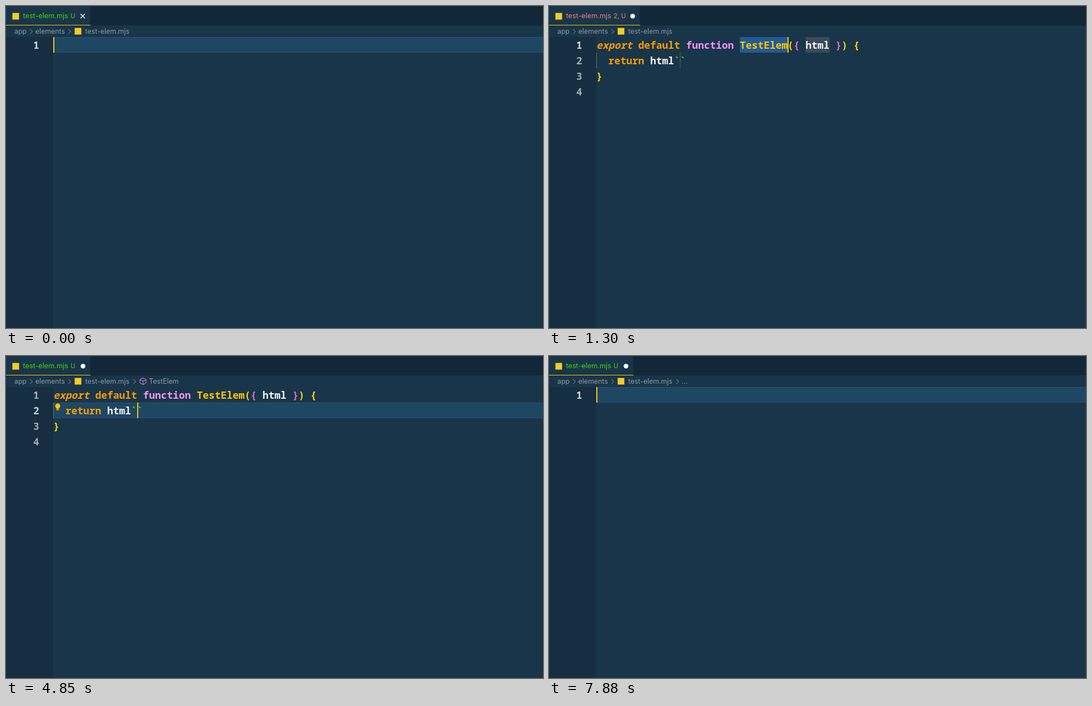
Write an HTML page with a canvas that moves like this. It is 966 px wide and 580 px high and loops after 8 s.

```html
<!DOCTYPE html>
<html lang="en">
<head>
<meta charset="utf-8">
<title>Snippet in a code editor</title>
<style>
html, body { margin: 0; width: 100%; height: 100%; overflow: hidden; background: #193549; }
canvas { display: block; }
</style>
</head>
<body>
<canvas id="stage" width="966" height="580"></canvas>
<script>
const c = document.getElementById('stage').getContext('2d');
const LOOP = 8000, LEFT = 85.3, TOP = 56, ROW = 28, CH = 10.752;
const MONO = '"Noto Sans Mono", "DejaVu Sans Mono", monospace', UI = 'Inter, Roboto, sans-serif';
const CODE = `600 17.92px ${MONO}`, ITALIC = `italic ${CODE}`, DETAIL = `600 15.25px ${MONO}`;
const GOLD = '#ffc600', ORANGE = '#ff9d00', PINK = '#fb94ff', GREEN = '#3ad900', BRACKET = '#ffd700',
  ORCHID = '#da70d6', WHITE = '#f0f4f6', GREY = '#aaaeb0', DIM = '#7c878e', BG = '#193549', PANEL = '#15232d';

const col = n => LEFT + n * CH;
const rowY = n => TOP + n * ROW;

function box(x, y, w, h, color) {
  c.fillStyle = color;
  c.fillRect(x, y, w, h);
}
function frame(x, y, w, h, color) {
  c.strokeStyle = color;
  c.lineWidth = 1;
  c.strokeRect(x + .5, y + .5, w - 1, h - 1);
}
function text(s, x, y, color, font = CODE, align = 'left') {
  c.font = font;
  c.fillStyle = color;
  c.textAlign = align;
  c.fillText(s, x, y);
}
function path(d, x, y, color, width = 1) {
  c.save();
  c.translate(x, y);
  c.strokeStyle = color;
  c.lineWidth = width;
  c.stroke(new Path2D(d));
  c.restore();
}
function disc(x, y, r, color) {
  c.fillStyle = color;
  c.beginPath();
  c.arc(x, y, r, 0, 7);
  c.fill();
}
// Parts are [text, colour, font], set one after another on the character grid.
function parts(x, y, list) {
  for (const [s, color, font] of list) {
    text(s, x, y, color, font);
    x += s.length * CH;
  }
}

const cube = (x, y) => path('M0-6L5.5-3V3L0 6L-5.5 3V-3ZM-5.5-3L0 0L5.5-3M0 0V6', x, y, '#b180d7', 1.1);
const icons = {
  k: (x, y) => path('M-7-4.5H-1M1-4.5H6M-7-1.5H3M-7 1.5H-3M-1 1.5H6M-7 4.5H1M3 4.5H6', x, y, '#b8bdc0', 1.2),
  f: cube,
  v: (x, y) => path('M-4-4H-6.5V4H-4M4-4H6.5V4H4M-3.5-.5L.5-2.5L3.5-1.5V1L-.5 3L-3.5 2ZM-3.5-.5L-.5 .5L3.5-1.5M-.5 .5V3', x, y, '#75beff', 1.1),
  s(x, y) {
    path('M-6 5.5V-5.5H6V5.5', x, y, '#b8bdc0');
    c.setLineDash([1, 1]);
    path('M-6 5.5H6', x, y, '#b8bdc0');
    c.setLineDash([]);
  }
};

// Each entry: icon, label (* marks a matched letter), detail; "-" marks a deprecated one.
const listOne = ['k|*else', 'f|*encodeURI', 'f|*encodeURIComponent', 'f|*eval', 'k|*export', 'v|*exports',
  'k|*extends', 's|*eelem|Enhance elem', 's|*error|Log error to console', 's|*etelem|Enhance typed elem'];
const listTwo = ['s|*e*elem|Enhance elem', 'v|*Eval*Error', 'v|*Error*Event', 's|*et*elem|Enhance typed elem',
  'v|-event', 'k|*els*e', 'k|*ext*ends', 'v|-external', 'v|*El*ement', 'v|*El*ementInternals'];

function suggest(x, list) {
  box(x, 84, 417, 282, PANEL);
  frame(x, 84, 417, 282, '#122430');
  box(x + 1, 85, 415, 28, BG);
  list.forEach((entry, i) => {
    const [icon, label, detail] = entry.split('|'), y = 85 + i * ROW, base = y + 20.5;
    icons[icon](x + 10.5, y + 14.5);
    let lx = x + 22.3;
    if (label[0] === '-') {
      text(label.slice(1), lx, base, DIM);
      box(lx, y + 14, (label.length - 1) * CH, 1.4, DIM);
    } else {
      for (const m of label.match(/\*?./g)) {
        text(m.slice(-1), lx, base, m[1] ? GOLD : GREY);
        lx += CH;
      }
    }
    if (detail) text(detail, x + 406.5, y + 19.5, i ? '#c3c7c9' : DIM, DETAIL, 'right');
  });
}

function docs() {
  const x = 528.4;
  box(523, 84, 320, 165, PANEL);
  frame(523, 84, 320, 165, '#122430');
  text('Export Enhance element (Enh', x, 109, DIM);
  text('ance.dev)', x, 137, DIM);
  c.save();
  c.beginPath();
  c.rect(523, 84, 320, 164);
  c.clip();
  parts(x, 180.5, [['export', ORANGE, ITALIC], [' default', ORANGE], [' function', PINK], [' (', '#ffee80'], ['{ html }', WHITE]]);
  parts(x + 4 * CH, 208.5, [['return', ORANGE], [' html', GOLD], ['``', GREEN]]);
  text('}', x, 236, WHITE);
  c.restore();
  box(524, 239, 251, 9, '#1b3a50');
  path('M-3.5-3.5L3.5 3.5M3.5-3.5L-3.5 3.5', 826.5, 98, '#b8bdc0');
}

function tab(errors, dirty) {
  const color = errors ? '#ec8575' : GREEN;
  const w = errors ? 162 + errors : 152;
  box(0, 0, 966, 35, '#122738');
  box(0, 0, 966, 1, '#1a2f40');
  box(0, 1, w, 34, BG);
  box(0, 34, w, 1, GOLD);
  box(w - 1, 1, 1, 33, '#15293a');
  box(11.5, 12.5, 12, 12, '#f5cc25');
  text('test-elem.mjs', 30.5, 22.3, color, `12.7px ${UI}`);
  text(errors ? errors + ', U' : 'U', 116, 22.3, color, `11.6px ${UI}`);
  if (dirty) disc(w - 13.5, 18.3, 4.2, '#fff');
  else path('M-4-4L4 4M4-4L-4 4', 138, 18.3, '#fff', 1.3);
}

function crumbs(last) {
  const font = `12.4px ${UI}`, color = '#8c9aa3';
  const chevron = x => path('M-2-4.5L2.5 0L-2 4.5', x, 46, color);
  text('app', 15, 50.3, color, font);
  chevron(45);
  text('elements', 52.7, 50.3, color, font);
  chevron(114);
  box(123.5, 39.5, 12, 12, '#f5cc25');
  text('test-elem.mjs', 142.5, 50.3, color, font);
  if (!last) return;
  chevron(231);
  if (last === '...') return text(last, 238.5, 50.3, color, font);
  cube(246.5, 45.5);
  text(last, 257.3, 50.3, color, font);
}

function highlight(n) {
  box(85, rowY(n), 881, ROW, '#1f4662');
  box(85, rowY(n), 881, 1, '#2a5474');
  box(85, rowY(n) + ROW - 1, 881, 1, '#2a5474');
}
function numbers(count, active) {
  for (let i = 0; i < count; i++) text(i + 1, 59.8, rowY(i) + 20.5, i === active ? '#d0d6d8' : '#a6adb1', CODE, 'right');
}
const cursor = (n, row) => box(Math.round(col(n) - .3), rowY(row), 2, ROW, GOLD);
function bulb(x, row) {
  const y = rowY(row);
  disc(x, y + 6, 4.5, GOLD);
  box(x - 2.2, y + 9, 4.4, 4.5, GOLD);
  box(x - 2.2, y + 11, 4.4, .8, '#8a7420');
}
const mark = (n, len, row, color) => box(col(n), rowY(row), len * CH, ROW, color);

function typing(t) {
  const n = t < 250 || t >= 7800 ? 0 : t < 650 ? 1 : 2;
  highlight(0);
  numbers(1, 0);
  text('e'.repeat(n), LEFT, 76.5, WHITE);
  if (n && t >= 330) path('M0 1' + 'q1.35-2.5 2.7 0t2.7 0'.repeat(n * 2), LEFT, 82, '#b5445a');
  if (t < 1140 || t >= 7800) cursor(n, 0);
  if (t >= 490 && t < 650) bulb(104, 0);
  if (t >= 890 && t < 1300) bulb(114.5, 0);
  if (t >= 330 && t < 650) {
    suggest(96, listOne);
    box(502, 85, 10, 19, '#1d3d53');
  }
  if (t >= 650 && t < 1300) {
    suggest(106.4, listTwo);
    docs();
  }
}

function snippet(t) {
  const SELECT = '#225a98', STOP = '#3a4b57';
  const word = 'noice'.slice(0, t < 6000 ? 0 : t < 6160 ? 1 : Math.floor((t - 6160) / 80) + 2);
  const inBody = t >= 4850 && t < 7390, all = t >= 7390;
  if (inBody) highlight(1);
  numbers(4, inBody ? 1 : all ? 3 : 0);
  if (t < 4850) {
    const second = t >= 2520;
    mark(24, 8, 0, second ? STOP : SELECT);
    mark(35, 4, 0, second ? SELECT : STOP);
    if (second) mark(9, 4, 1, STOP);
    box(235, rowY(1), 2, ROW, STOP);
  }
  if (all) [45, 21, 2].forEach((len, i) => mark(0, len, i, SELECT));
  box(85, rowY(1), 1, ROW, '#56864f');
  if (inBody && t >= 4930) {
    for (const [n, row] of [[43, 0], [0, 2]]) {
      mark(n, 1, row, 'rgba(0,100,0,.1)');
      frame(Math.round(col(n) - .3), rowY(row), 11, ROW, '#7d8a2c');
    }
  }
  parts(LEFT, 76.5, [['export', ORANGE, ITALIC], [' default', ORANGE], [' function', PINK], [' TestElem', GOLD],
    ['(', BRACKET], ['{', ORCHID], [' html ', WHITE], ['}', ORCHID], [')', BRACKET], [' {', BRACKET]]);
  parts(col(2), 104.5, [['return', ORANGE], [' html', WHITE], ['`' + word + '`', GREEN]]);
  text('}', LEFT, 132.5, BRACKET);

  const blink = start => Math.floor((t - start) / 500) % 2 === 0;
  if (t < 2520) {
    if (t < 1780 || t >= 2360) cursor(32, 0);
  } else if (t < 4850) {
    if (blink(2520)) cursor(39, 0);
  } else if (t < 6000) {
    if (blink(4840)) cursor(14, 1);
  } else if (!all) {
    if (t < 6890) cursor(14 + word.length, 1);
  } else cursor(0, 3);

  if (t >= 6810) for (let i = 0; i < 3; i++) box(236 + i * 3.6, 109, 1.8, 1.8, '#a9b4ba');
  const hidden = t < 1700 || t >= 4930 && t < 5090 || t >= 6810 && t < 6890 || t >= 7470;
  if (!hidden) bulb(93, 1);
}

function draw(t) {
  const errors = t < 330 || t >= 1620 ? 0 : t < 730 || t >= 1460 ? 1 : 2;
  box(0, 0, 966, 580, BG);
  box(0, TOP, 85, 524, '#172e42');
  tab(errors, t >= 250);
  crumbs(t < 1700 ? '' : t < 7550 ? 'TestElem' : '...');
  if (t < 1300 || t >= 7800) typing(t);
  else snippet(t);
}

const begin = performance.now();
function tick() {
  draw((performance.now() - begin) % LOOP);
  requestAnimationFrame(tick);
}
tick();
</script>
</body>
</html>
```
